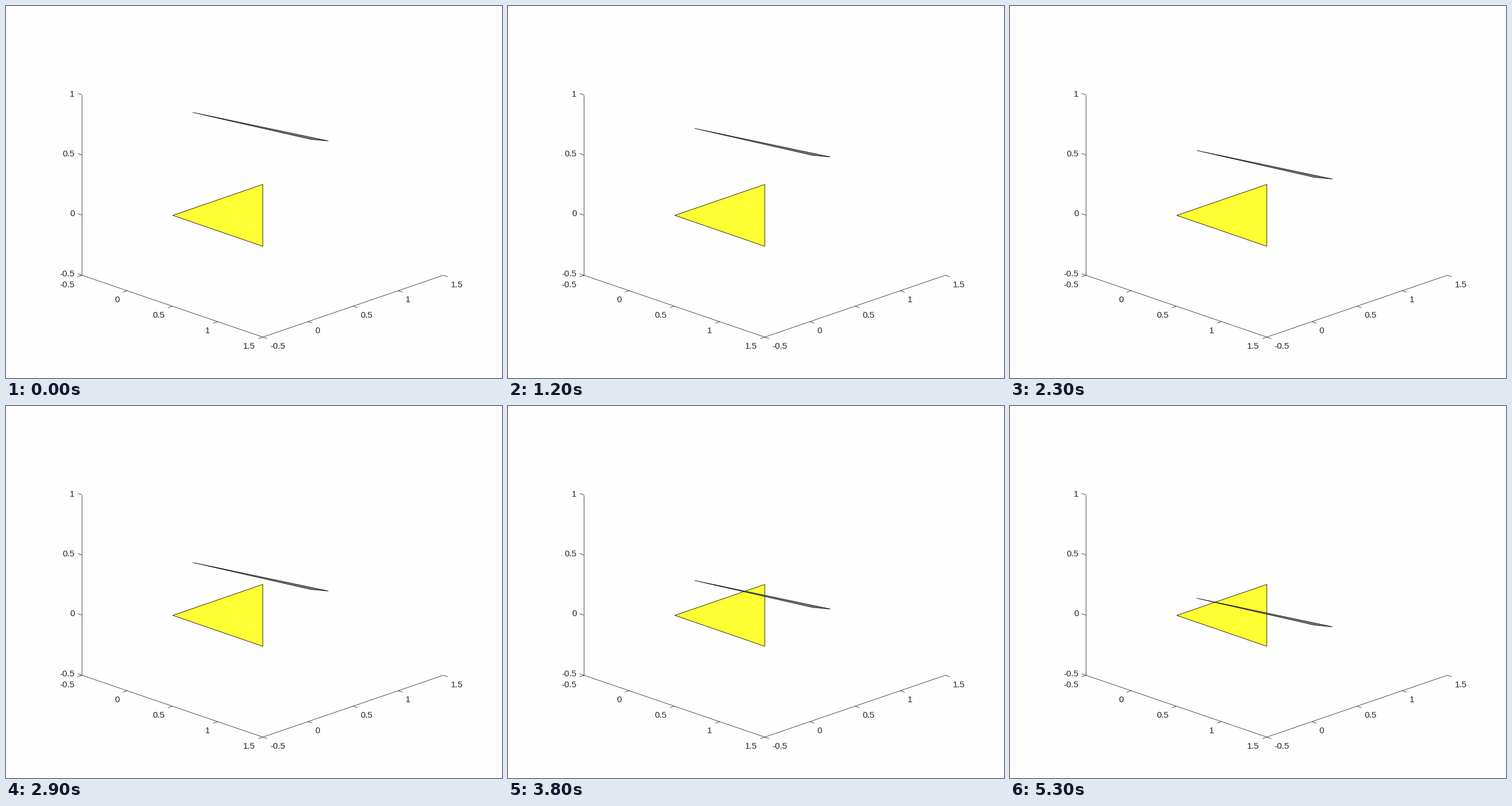
Animation of 864 by 648 pixels, one loop 5400 ms. Source, as a matplotlib script:

```python
import numpy as np
import matplotlib.pyplot as plt
from matplotlib.animation import FuncAnimation
from matplotlib.patches import Polygon

W, H = 864, 648
FRAMES, INTERVAL = 54, 100
HOLD = 4          # last still frame before the fall
FULL_STEPS = 42   # equal steps before contact is refined
STEP = 3.49       # fall per frame in pixels
CONTACT = 0.85    # part of one more step left until contact
INK = "#262626"
THIN = 0.8

plt.rcParams["font.family"] = "Liberation Sans"
fig = plt.figure(figsize=(W / 72, H / 72), dpi=72, facecolor="#fefefe")
ax = fig.add_axes([0, 0, 1, 1])
ax.set_xlim(0, W)
ax.set_ylim(H, 0)
ax.axis("off")

LEFT = np.array([132.2, 469.0])
FRONT = np.array([447.3, 576.7])
RIGHT = np.array([762.0, 469.0])
TOP = np.array([132.2, 154.7])


def line(a, b):
    ax.plot([a[0], b[0]], [a[1], b[1]], color=INK, lw=THIN,
            solid_capstyle="butt")


def axis(start, end, tick, labels, first, last, ha):
    """Ruler from start to end with ticks and labels spaced evenly."""
    line(start, end)
    for k, text in zip(np.linspace(0, 1, len(labels)), labels):
        p = start + (end - start) * k
        line(p, p + tick)
        x, y = np.array(first) + (np.array(last) - first) * k
        ax.text(x, y, text, ha=ha, va="baseline", fontsize=15.2, color=INK)


def triangle(points, face):
    patch = Polygon(points, closed=True, fc=face, ec="black", lw=THIN,
                    joinstyle="round")
    ax.add_patch(patch)
    return patch


floor = ["-0.5", "0", "0.5", "1", "1.5"]
axis(LEFT, TOP, np.array([-7.5, -2.5]), floor[:4],
     (119.4, 470.9), (119.4, 157.7), "right")
axis(LEFT, FRONT, np.array([-7.5, 2.6]), floor,
     (119.0, 489.6), (433.8, 596.9), "right")
axis(FRONT, RIGHT, np.array([7.5, 2.6]), floor,
     (460.0, 596.9), (774.7, 489.6), "left")

triangle([(290.5, 364.7), (447.3, 310.8), (447.3, 418.6)], "#ffff33")

SLIVER = np.array([(325.5, 185.4), (530.5, 232.2), (561.4, 235.0)])
sliver = triangle(SLIVER, "#7c7878")
sliver.set_zorder(5)


def fallen(n):
    """Steps travelled: constant speed, then halving steps up to contact."""
    k = max(0, n - HOLD)
    if k <= FULL_STEPS:
        return k
    return FULL_STEPS + CONTACT * (1 - 0.5 ** (k - FULL_STEPS))


def draw(n):
    sliver.set_xy(SLIVER + (0, STEP * fallen(n)))
    return [sliver]


def reset():
    return draw(0)


anim = FuncAnimation(fig, draw, frames=FRAMES, init_func=reset,
                     interval=INTERVAL, repeat=True, repeat_delay=0)
plt.show()
```
